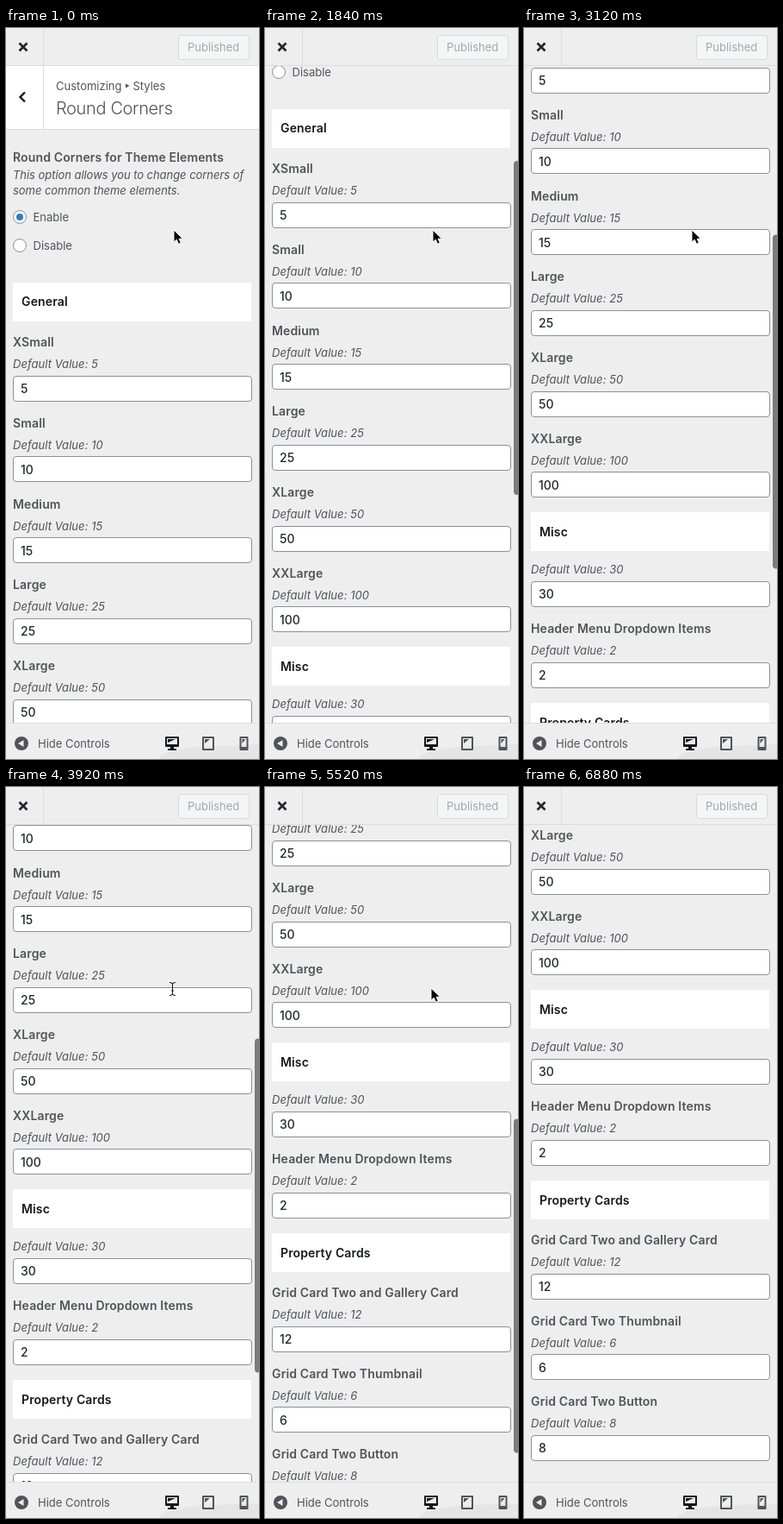
These frames come from a looping animation (294 px wide and 847 px high, 7.28 s). An HTML page:

```html
<!DOCTYPE html>
<html lang="en">
<head>
<meta charset="utf-8">
<title>Round Corners</title>
<style>
html, body { margin: 0; width: 100%; height: 100%; overflow: hidden; background: #eee; }
#stage { position: relative; width: 294px; height: 847px; overflow: hidden; background: #eee;
  font: 13px/20px Inter, "Open Sans", sans-serif; color: #50535a; }
#stage div, #stage svg { position: absolute; box-sizing: border-box; }
#view { left: 0; top: 44px; width: 294px; height: 761px; overflow: hidden; }
#page { left: 0; top: -44px; width: 294px; height: 1500px; will-change: transform; }
.t { white-space: pre; }
.b { font-size: 14px; font-weight: 600; letter-spacing: .14px; }
.i { font-style: italic; letter-spacing: .06px; }
.p { font-style: italic; letter-spacing: -.05px; }
.h { font-size: 20px; font-weight: 300; letter-spacing: -.35px; }
.v { font-size: 14px; font-weight: 450; color: #24292e; }
.dark { color: #15171a; }
.pub { color: #a5a8ac; }
.field { left: 8px; width: 278px; height: 30px; background: #fff; border: 1px solid #8c8f94; border-radius: 4px; }
.band { left: 8px; width: 277px; height: 45px; background: #fff; }
.radio { left: 8px; width: 16px; height: 16px; border: 1px solid #8c8f94; border-radius: 50%; background: #fff; }
.radio.on::after { content: ""; position: absolute; left: 3px; top: 3px; width: 8px; height: 8px; border-radius: 50%; background: #2f7fc1; }
#title { left: 0; top: 44px; width: 294px; height: 74px; background: #fff; border-bottom: 1px solid #ddd; }
.rule { left: 43px; width: 1px; background: #ddd; }
#top { left: 0; top: 0; width: 294px; height: 44px; background: #eee; border-bottom: 1px solid #ddd; }
#button { left: 200px; top: 8px; width: 83px; height: 29px; border: 1px solid #d9dadd; border-radius: 3px; background: #f4f5f5; }
#foot { left: 0; top: 805px; width: 294px; height: 42px; background: #eee; border-top: 1px solid #ddd; overflow: hidden; }
#thumb { left: 289px; top: 0; width: 8px; height: 387px; border-radius: 4px; background: #7b7b7b; }
</style>
</head>
<body>
<div id="stage">
  <div id="view"><div id="page">
    <div id="title"></div>
    <div class="rule" style="top:44px;height:73px"></div>
    <svg style="left:12px;top:71px" width="14" height="18"><path d="M10 3.5 4.5 9 10 14.5" fill="none" stroke="#15171a" stroke-width="2.4"/></svg>
    <svg style="left:138px;top:63px" width="7" height="8"><path d="M1 1.5 5.5 4 1 6.5Z" fill="#50535a"/></svg>
  </div><div id="thumb"></div></div>
  <div id="top">
    <div class="rule" style="top:0;height:43px"></div>
    <svg style="left:12px;top:14px" width="16" height="16"><path d="M3.5 3.5 12.5 12.5M12.5 3.5 3.5 12.5" stroke="#24272c" stroke-width="2.7"/></svg>
    <div id="button"></div>
  </div>
  <div id="foot">
    <svg style="left:0;top:-1px" width="294" height="42">
      <path d="M178 42C182 32 215 28 240 27L294 25V42Z" fill="#e5e5e5"/>
      <circle cx="18" cy="24" r="8" fill="#50535a"/>
      <path d="M20.5 20V28L14 24Z" fill="#eee"/>
      <g fill-rule="evenodd" fill="#50535a">
        <path transform="translate(183 14)" fill="#15171a" d="M3 2H17Q18 2 18 3V13Q18 14 17 14H12V16H14Q15 16 15 17V18H5V17Q5 16 6 16H8V14H3Q2 14 2 13V3Q2 2 3 2ZM16 11V4H4V11ZM5 5H14L5 9Z"/>
        <path transform="translate(225 14)" d="M4 2H16Q17 2 17 3V17Q17 18 16 18H4Q3 18 3 17V3Q3 2 4 2ZM15 16V4H5V16ZM6 5H12L6 10Z"/>
        <path transform="translate(266.5 14)" d="M6 2H14Q15 2 15 3V17Q15 18 14 18H6Q5 18 5 17V3Q5 2 6 2ZM13 14V4H7V14ZM8 5H12L8 10Z"/>
      </g>
    </svg>
  </div>
  <svg id="arrow" style="left:0;top:0" width="14" height="20"><path d="M1 1V15.2L4.3 12.2 6.5 17.3 9.3 16.1 7.1 11.2H11.5Z" stroke="#fff"/></svg>
  <svg id="beam" style="left:0;top:0" width="10" height="18"><path d="M1.5 1.5Q5 1.5 5 4Q5 1.5 8.5 1.5M5 4V14M1.5 16.5Q5 16.5 5 14Q5 16.5 8.5 16.5M3.5 11H6.5" fill="none" stroke="#222" stroke-width="1.1"/></svg>
</div>
<script>
const $ = id => document.getElementById(id);

function add(parent, cls, top, text = "", left) {
  const el = document.createElement("div");
  el.className = cls;
  el.style.top = top + "px";
  if (left !== undefined) el.style.left = left + "px";
  el.textContent = text;
  parent.append(el);
}
// y is the middle of the capitals
const text = (cls, x, y, str, parent = $("page")) => add(parent, "t " + cls, y - 10, str, x);

function field(y, value, label) {
  if (label) text("b", 8, y - 54, label);
  text("i", 8, y - 29, "Default Value: " + value);
  add($("page"), "field", Math.round(y - 15.5));
  text("v", 17, y, value);
}
function band(y, label) {
  add($("page"), "band", Math.round(y - 22.5));
  text("b dark", 18, y, label);
}
function radio(y, label, on) {
  add($("page"), on ? "radio on" : "radio", y - 8);
  text("", 31.5, y, label);
}

text("", 58, 66.5, "Customizing");
text("", 147.5, 66.5, "Styles");
text("h", 58, 92.5, "Round Corners");
text("b", 8, 149.5, "Round Corners for Theme Elements");
text("p", 8, 170, "This option allows you to change corners of");
text("p", 8, 188, "some common theme elements.");
radio(218.5, "Enable", true);
radio(251.5, "Disable");
band(317, "General");
["XSmall", "Small", "Medium", "Large", "XLarge", "XXLarge"].forEach((name, i) =>
  field(418 + i * 93.75, [5, 10, 15, 25, 50, 100][i], name));
band(940.5, "Misc");
field(1013, 30);
field(1107, 2, "Header Menu Dropdown Items");
band(1161.5, "Property Cards");
field(1262, 12, "Grid Card Two and Gallery Card");
field(1355.75, 6, "Grid Card Two Thumbnail");
field(1449, 8, "Grid Card Two Button");
text("pub", 211, 22, "Published", $("top"));
text("", 37, 23, "Hide Controls", $("foot"));

const LOOP = 7280, STEP = 80, END = 683;
// time, scroll offset
const path = [
  [640, 0], [800, 10], [1120, 79], [1440, 150], [1840, 201], [2160, 208],
  [2400, 208], [2560, 216], [2800, 270], [3120, 357], [3520, 432], [3920, 452],
  [4160, 452], [4320, 464], [4560, 530], [4800, 592], [5120, 619],
  [5440, 619], [5520, 622], [5680, 642], [5920, 672], [6240, END], [LOOP, END]
];

const slope = i => {
  if (i < 1 || i > path.length - 2) return 0;
  const rate = k => (path[k + 1][1] - path[k][1]) / (path[k + 1][0] - path[k][0]);
  const a = rate(i - 1), b = rate(i);
  return a * b > 0 ? 2 * a * b / (a + b) : 0;
};

function scrollAt(t) {
  const i = path.findIndex(p => p[0] > t) - 1;
  if (i < 0) return 0;
  const [t0, s0] = path[i], [t1, s1] = path[i + 1];
  const d = t1 - t0, u = (t - t0) / d, w = 1 - u;
  return s0 * w * w * (1 + 2 * u) + s1 * u * u * (3 - 2 * u)
    + d * u * w * (w * slope(i) - u * slope(i + 1));
}

const move = (el, x, y) => { el.style.transform = `translate(${x}px, ${y}px)`; };

function pointer(t) {
  if (t < 3840) return [194, 233];
  return t < 6400 ? [192, 232] : [250, 165];
}

function draw(t) {
  const s = scrollAt(t);
  move($("page"), 0, -Math.round(s));
  move($("thumb"), 0, s * 374 / END);
  $("thumb").style.opacity = t < 720 ? 0 : Math.max(0, Math.min(1, (6880 - t) / 240));

  const typing = t >= 3840 && t < 4320;
  $("arrow").style.display = typing || t >= 6480 ? "none" : "";
  $("beam").style.display = typing ? "" : "none";
  move($("arrow"), ...pointer(t));
  move($("beam"), 188.5, 225);
}

function tick() {
  draw(Math.floor(performance.now() % LOOP / STEP) * STEP);
  requestAnimationFrame(tick);
}
tick();
</script>
</body>
</html>
```
